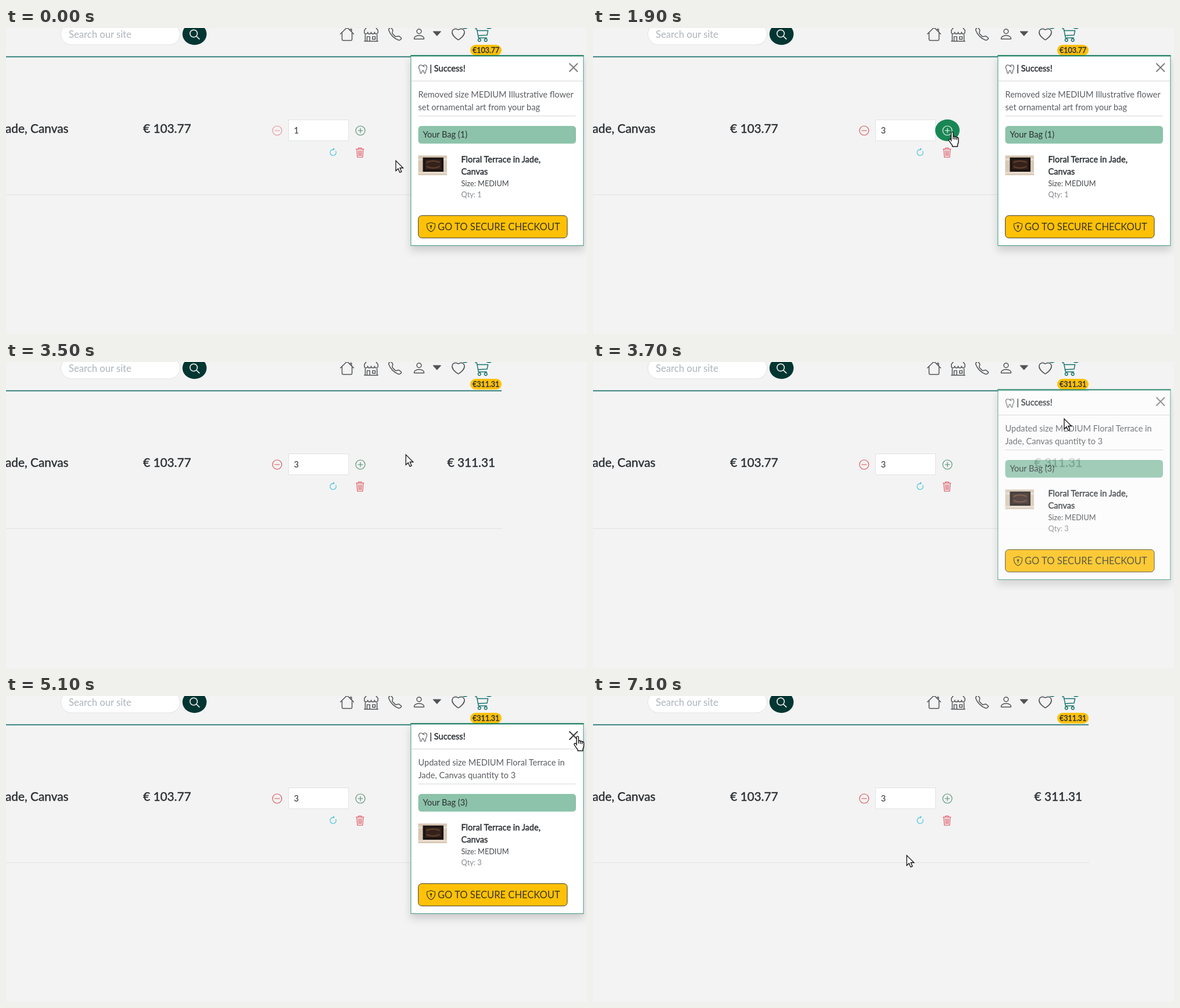
These frames come from a looping animation (1000 by 528 pixels, 7.2 s). An HTML page:

```html
<!DOCTYPE html>
<html lang="en">
<head>
<meta charset="utf-8">
<title>Shopping bag update</title>
<style>
  html, body { margin: 0; width: 100%; height: 100%; overflow: hidden; background: #f3f3f3; }
  svg { display: block; width: 100%; height: 100%; font-family: Lato, sans-serif; }
  text { fill: #2b2f33; font-size: 14.56px; white-space: pre; }
  .line { fill: none; stroke: #505356; stroke-width: 1.1; stroke-linejoin: round; stroke-linecap: round; }
  .icons { stroke-width: .95; }
  .teal { stroke: #17746f; }
  .red { stroke: #dc4a56; }
  .bold { stroke: #2b2f33; stroke-width: .45px; }
  .price { font-size: 20.8px; }
  .small { font-size: 12.7px; fill: #44484c; }
  .badge { font-size: 12.48px; }
  .soft { fill: #5a5d61; }
</style>
</head>
<body>
<svg viewBox="0 0 1000 528">
  <defs>
    <filter id="shadow" x="-15%" y="-15%" width="130%" height="130%">
      <feDropShadow dx="0" dy="8" stdDeviation="7" flood-opacity=".16"/>
    </filter>
  </defs>
  <rect width="1000" height="528" fill="#f3f3f3"/>

  <!-- Header -->
  <rect x="94.5" y="-8" width="205" height="37" rx="18.5" fill="#fff" stroke="#dfe2e5"/>
  <text x="108" y="16.5" style="font-size:16.65px;fill:#adb4bb">Search our site</text>
  <ellipse cx="324.5" cy="10.5" rx="20.8" ry="18.7" fill="#023632"/>
  <g class="line" style="stroke:#fff;stroke-width:1.5">
    <circle cx="323" cy="9.5" r="6.3"/><path d="m327.8 14.3 5 4.8"/>
  </g>
  <path d="M0 49.6H853" stroke="#1d736e" stroke-width="1.8"/>
  <!-- Icons on a 16 unit grid -->
  <g class="line icons">
    <path transform="translate(574.5 -2) scale(1.56)" d="M.7 7.8 8 .7l7.300 7.100M2.500 6.500V14q0 1 1 1h9q1 0 1-1V6.500M11.500 3.500v-1H13v3"/>
    <path transform="translate(616 -1.500) scale(1.56)" d="M2.900.5h10.200l2.400 3v2.100a1.875 1.875 0 0 1-3.750 0a1.875 1.875 0 0 1-3.750 0a1.875 1.875 0 0 1-3.750 0a1.875 1.875 0 0 1-3.750 0V3.500zM1.500 8.500v7M14.500 8.500v7M.5 15.500h15M3.500 15.500v-5h3v5M9.500 10.500h3v3h-3z"/>
    <path transform="translate(657 -2.500) scale(1.58)" d="M3.650 1.330a.68.68 0 0 0-1-.06L1.600 2.300c-.48.48-.66 1.170-.45 1.770a17.600 17.600 0 0 0 4.170 6.600 17.600 17.600 0 0 0 6.600 4.170c.6.210 1.290.030 1.770-.45l1.030-1.030a.68.68 0 0 0-.06-1L12.360 10.550a.68.68 0 0 0-.58-.12l-2.190.55a1.750 1.750 0 0 1-1.660-.46L5.480 8.060a1.750 1.750 0 0 1-.46-1.660l.55-2.190a.68.68 0 0 0-.12-.58z"/>
    <g transform="translate(698.5 -2) scale(1.56)">
      <circle cx="8" cy="5" r="2.500"/><path d="M2.500 13c0-4.500 11-4.500 11 0q0 .5-.5.500H3q-.5 0-.5-.5"/>
    </g>
    <path transform="translate(766 -2) scale(1.56)" d="M8 14.500C-4 6.800 2.500-.5 8 3.300c5.500-3.800 12 3.500 0 11.200z"/>
    <g class="teal" transform="translate(807 -1) scale(1.56)">
      <path d="M.5 1.500H2l.5 2h12l-1 5-9.500.5M2.500 3.500 4 11.500h9"/>
      <circle cx="5" cy="14" r="1.500"/><circle cx="12" cy="14" r="1.500"/>
    </g>
  </g>
  <path d="M735 6h13.500l-6.700 7.500z" fill="#505356" stroke="#505356" stroke-linejoin="round"/>
  <path d="M784-1q6 5 12 0zM825-1q6 5 13 0z" fill="#056d69"/>
  <rect x="799" y="29" width="54" height="18.500" rx="9.250" fill="#ffc107"/>
  <text id="badge" class="badge bold" x="803" y="43"></text>

  <!-- Bag row -->
  <text class="price bold" x="107.500" y="181" text-anchor="end">Jade, Canvas</text>
  <text class="price bold" x="236" y="181">€ 103.77</text>
  <text id="total" class="price bold" x="759.500" y="181"></text>
  <path d="M0 287.500H854" stroke="#dfe1e3"/>
  <g id="minus" class="line red">
    <circle cx="466.700" cy="177" r="8"/><path d="M462.700 177h8"/>
  </g>
  <rect x="486.500" y="158.500" width="103" height="36" fill="#fff" stroke="#e0e2e4"/>
  <text id="quantity" x="495.500" y="181.500"></text>
  <ellipse id="plusFill" cx="610" cy="176.500" rx="21" ry="18.700" fill="#198754"/>
  <g id="plus" class="line">
    <circle cx="610" cy="177" r="8"/><path d="M606 177h8m-4-4v8"/>
  </g>
  <rect id="refreshBox" x="542" y="195.500" width="42" height="38.500" rx="6" fill="#f4f8f9" stroke="#5ccfe3" stroke-width="1.200"/>
  <g transform="translate(554.700 206.500) scale(1.04)">
    <path class="line" style="stroke:#3fc3dd" d="M8 3a5 5 0 1 0 4.550 2.900"/>
    <path d="M8 4.600V.4l2.800 2.100z" fill="#3fc3dd"/>
  </g>
  <path class="line red" d="M602.500 209h13.500M606.500 209v-2h5.500v2M603.800 209l1 14h9l1-14M606.800 211.500l.4 9M609.300 211.500v9M611.800 211.500l-.4 9"/>

  <!-- Notification -->
  <g id="toast">
    <rect x="696.900" y="47.500" width="297" height="328" fill="#fff" stroke="#3c987f" filter="url(#shadow)"/>
    <path d="M696.400 47.800H994.400" stroke="#1d8064" stroke-width="2.200"/>
    <path d="M697.500 91.500H993.500M709.500 151.800H981" stroke="#d3d5d7"/>
    <path class="line" d="M717.500 65.500c-3-3-7-2-7 2.500 0 3 1.700 4 2 6 .3 2 .5 4.500 1.800 4.500 2 0 1-5.500 3.200-5.500s1.200 5.500 3.200 5.500c1.300 0 1.500-2.500 1.800-4.500.3-2 2-3 2-6 0-4.500-4-5.500-7-2.500l2.500 1.500"/>
    <text class="bold" x="729.500" y="74.500">| Success!</text>
    <rect id="ring" x="964" y="55" width="26" height="26" rx="7" fill="#fff" stroke="#c2dafe" stroke-width="4"/>
    <path id="close" d="m970 61.500 13.500 13.500m0-13.500L970 75" stroke="#000" stroke-width="2" stroke-linecap="round"/>
    <text id="line1" class="soft" x="709.500" y="120"></text>
    <text id="line2" class="soft" x="709.500" y="141.500"></text>
    <rect x="709.500" y="169" width="271.500" height="30.500" rx="5.500" fill="#8cc3aa"/>
    <text id="bag" x="717.500" y="188.500"></text>
    <g>
      <rect x="709.500" y="220" width="49.500" height="34" fill="#d8c8b5"/>
      <path d="M709.500 227h49.500M709.500 250h49.500" stroke="#e9ddcf" stroke-width="3"/>
      <rect x="717.500" y="223.500" width="35.500" height="24.500" fill="#1b1412"/>
      <rect x="721.500" y="227" width="27.500" height="17" fill="#35211a"/>
      <path d="M724 232q11-5 22 0M724 239q11 5 22 0" fill="none" stroke="#75503a" stroke-width="2.200" stroke-dasharray="2 1"/>
    </g>
    <text class="bold" x="783.500" y="231.500">Floral Terrace in Jade,</text>
    <text class="bold" x="783.500" y="253">Canvas</text>
    <text class="small" x="783.500" y="273">Size: MEDIUM</text>
    <text id="itemCount" class="small" x="783.500" y="292" style="fill:#84888c"></text>
    <rect x="709.700" y="323.700" width="256.300" height="38.500" rx="6" fill="#ffc107" stroke="#3d3a2c"/>
    <path class="line" style="stroke:#39361f" d="M731.500 335.500q3.500 2 7 2.300c.8 7-2 11.500-7 13.700-5-2.200-7.800-6.700-7-13.700q3.500-.3 7-2.300zM731.500 342v4.500"/>
    <circle cx="731.500" cy="342" r="1.800" fill="#39361f"/>
    <text x="743" y="349" style="font-size:16.550px;fill:#39361f">GO TO SECURE CHECKOUT</text>
  </g>

  <g id="arrow">
    <path d="M0 0V17.500l4-3.800 2.800 6.500 3-1.300L7 12.500h5.500z" fill="#fff" stroke="#111" stroke-width="1.300"/>
  </g>
  <g id="hand">
    <path transform="translate(-6 0)" fill="#fff" stroke="#111" stroke-width="1.400" stroke-linejoin="round"
      d="M4.500 14V2.200C4.500-.2 8-.2 8 2.200V9c0-1.400 3-1.400 3 .4 0-1.200 3-1 3 .8 0-1 3-.6 3 1.300V17c0 3-1.500 4-1.500 6v2.500h-9v-2C4 20 2.500 18.500.8 15.500-.6 13 2 11.600 4.500 14v2.500M8 9v4M11 9.500v4M14 10.500v3.500"/>
  </g>
</svg>
<script>
const LOOP = 7200, STEP = 100;
const RELOAD = 3400, FADE_IN = 3580, FADE_OUT = 6450, FADE = 150;

// Pointer hot spot: time, x, y
const pointerPath = [
  [0, 671, 229], [500, 618, 179], [1950, 618, 179], [2500, 565.5, 222],
  [3300, 565.5, 222], [3700, 811, 98], [4100, 983.5, 73], [4950, 983.5, 73],
  [5100, 983.5, 69], [6800, 983.5, 69], [7100, 540, 275], [LOOP, 540, 275]
];

const el = id => document.getElementById(id);
const clamp = v => Math.max(0, Math.min(1, v));
const show = (id, visible) => el(id).style.display = visible ? '' : 'none';
const write = (id, value) => { if (el(id).textContent !== value) el(id).textContent = value; };

function pointerAt(t) {
  const i = pointerPath.findIndex(p => p[0] > t);
  const [t0, x0, y0] = pointerPath[i - 1], [t1, x1, y1] = pointerPath[i];
  const k = (t - t0) / (t1 - t0);
  return [x0 + (x1 - x0) * k, y0 + (y1 - y0) * k];
}

function toastOpacity(t) {
  if (t < RELOAD) return 1;
  return t < FADE_OUT ? clamp((t - FADE_IN) / FADE) : clamp(1 - (t - FADE_OUT) / FADE);
}

function render(t) {
  const [x, y] = pointerAt(t);
  const updated = t >= RELOAD;
  const quantity = t < 900 ? 1 : t < 1100 ? 2 : 3;
  const count = updated ? 3 : 1;
  const amount = updated ? '311.31' : '103.77';
  const opacity = toastOpacity(t);

  const inside = (left, top, right, bottom) => x > left && x < right && y > top && y < bottom;
  const onPlus = Math.hypot((x - 610) / 21, (y - 176.5) / 18.7) < 1;
  const onRefresh = inside(541, 195, 585, 234);
  const onClose = opacity > 0 && inside(965, 56, 990, 81);
  const focused = t >= 6300;

  write('badge', '€' + amount);
  write('total', '€ ' + amount);
  write('quantity', String(quantity));
  write('bag', `Your Bag (${count})`);
  write('itemCount', `Qty: ${count}`);
  write('line1', updated ? 'Updated size MEDIUM Floral Terrace in' : 'Removed size MEDIUM Illustrative flower');
  write('line2', updated ? 'Jade, Canvas quantity to 3' : 'set ornamental art from your bag');

  el('minus').style.opacity = quantity > 1 ? 1 : .6;
  el('plus').style.stroke = onPlus ? '#fff' : '#4a8d6e';
  show('plusFill', onPlus);
  show('refreshBox', onRefresh);
  show('ring', focused);
  el('close').style.opacity = focused ? 1 : onClose ? .75 : .5;
  el('toast').style.opacity = opacity;

  const hand = onPlus || onRefresh || onClose;
  show('hand', hand);
  show('arrow', !hand);
  el(hand ? 'hand' : 'arrow').setAttribute('transform', `translate(${x} ${y})`);
}

function frame() {
  render(Math.floor(performance.now() % LOOP / STEP) * STEP);
  requestAnimationFrame(frame);
}
frame();
</script>
</body>
</html>
```
